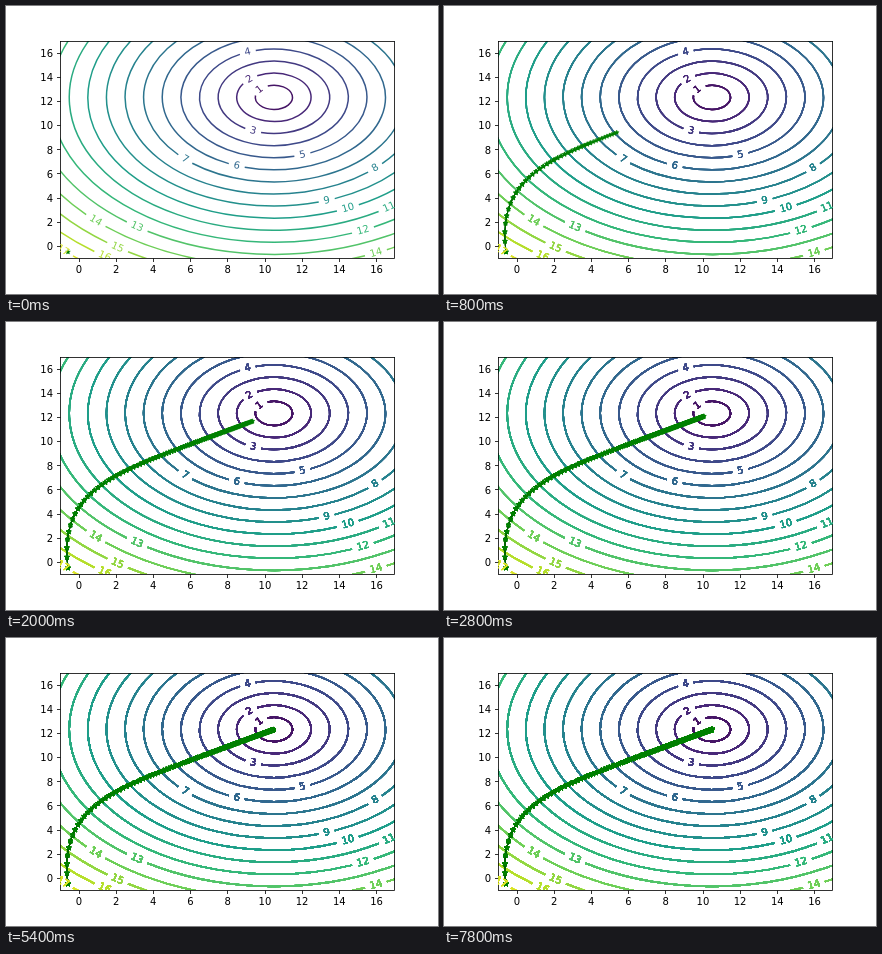
Write an HTML page that moves like this. It is 432x288 px and loops after 8 s.

```html
<!DOCTYPE html>
<html lang="en">
<head>
<meta charset="utf-8">
<title>Gradient descent on a contour plot</title>
<style>
  html, body { margin: 0; width: 100%; height: 100%; overflow: hidden; background: #fff; }
  svg { display: block; width: 432px; height: 288px; }
  text { font: 10px "DejaVu Sans", sans-serif; }
</style>
</head>
<body>
<svg id="stage" viewBox="0 0 432 288">
  <defs>
    <clipPath id="axes"><rect x="54" y="35" width="335" height="217"/></clipPath>
    <g id="rings" fill="none" stroke-width="1.5"></g>
    <g id="labels" text-anchor="middle"></g>
  </defs>
  <rect width="432" height="288" fill="#fff"/>
  <g clip-path="url(#axes)">
    <g id="ringLayers"></g>
    <g id="trailLayers" stroke-linejoin="bevel"></g>
  </g>
  <g id="frame" stroke="#000" stroke-width=".8" fill="none">
    <rect x="54.5" y="35.5" width="334" height="217"/>
  </g>
  <g id="ticks"></g>
  <g clip-path="url(#axes)"><g id="labelLayers"></g></g>
</svg>
<script>
const STEP = 200, COUNT = 40, PER_STEP = 10;
const UX = 18.6, UY = 12.08;                     // pixels per data unit
const px = x => 54 + (x + 1) * UX;
const py = y => 252 - (y + 1) * UY;
const GOAL = { x: 10.5, y: 12.3 };
const cx = px(GOAL.x), cy = py(GOAL.y);
const $ = id => document.getElementById(id);

function add(parent, tag, attrs, text) {
  const el = document.createElementNS('http://www.w3.org/2000/svg', tag);
  for (const k in attrs) el.setAttribute(k, attrs[k]);
  if (text !== undefined) el.textContent = text;
  parent.appendChild(el);
  return el;
}

// Viridis, sampled at every half stop
const VIRIDIS = ['440154', '482878', '3e4989', '31688e', '26828e',
                 '1f9e89', '35b779', '6ece58', 'b5de2b', 'fde725'];
const rgb = hex => [0, 2, 4].map(i => parseInt(hex.slice(i, i + 2), 16));
function color(level) {
  const a = rgb(VIRIDIS[Math.floor(level / 2)]), b = rgb(VIRIDIS[Math.ceil(level / 2)]);
  return `rgb(${a.map((v, i) => Math.round((v + b[i]) / 2))})`;
}

// Contour labels: level and the visible middle of the digits
const LABELS = [
  [1, 254, 83], [2, 243, 72], [3, 247, 124], [4, 241.5, 45], [5, 297, 149],
  [6, 230, 160], [7, 179.5, 152], [8, 369, 161], [9, 321, 194], [10, 342.5, 202],
  [11, 384, 201], [12, 357.5, 224], [13, 132, 219], [14, 90, 213.5], [14, 370, 246],
  [15, 112, 240], [16, 99, 249], [17, 57, 243.5]
];
const RISE = 0.85;                               // digits sit this far above the line
const gaps = {};                                 // level -> [centre angle, half width]

const onRing = (n, a) => [cx + UX * n * Math.cos(a), cy + UY * n * Math.sin(a)];
const fmt = p => p.map(v => v.toFixed(2)).join(' ');

for (const [n, x, y] of LABELS) {
  const a = Math.atan2((y + RISE - cy) / UY, (x - cx) / UX);
  const tx = -UX * n * Math.sin(a), ty = UY * n * Math.cos(a);
  const half = (n > 9 ? 6.36 : 3.18) + 5;
  (gaps[n] = gaps[n] || []).push([a, half / Math.hypot(tx, ty)]);
  const turn = Math.atan(ty / tx) * 180 / Math.PI;
  add($('labels'), 'text', {
    y: 3.65 - RISE, fill: color(n),
    transform: `translate(${fmt(onRing(n, a))}) rotate(${turn.toFixed(2)})`
  }, n);
}

function ringPath(n) {
  const list = gaps[n].sort((p, q) => p[0] - q[0]);
  return list.map(([a, h], i) => {
    const last = i === list.length - 1;
    const next = list[(i + 1) % list.length];
    const from = a + h, to = next[0] - next[1] + (last ? 2 * Math.PI : 0);
    const large = to - from > Math.PI ? 1 : 0;
    return `M${fmt(onRing(n, from))}A${UX * n} ${UY * n} 0 ${large} 1 ${fmt(onRing(n, to))}`;
  }).join('');
}
for (let n = 1; n <= 17; n++) add($('rings'), 'path', { d: ringPath(n), stroke: color(n) });

// Descent: a slow and a fast mode at right angles
const SLOPE = 0.567, SLOW = 13.87, FAST = 4.936;
function descent(k) {
  const s = SLOW * Math.pow(0.9754, k), f = FAST * Math.pow(0.859, k);
  return [px(GOAL.x - s + SLOPE * f), py(GOAL.y - SLOPE * s - f)];
}

const STAR = Array.from({ length: 10 }, (_, i) => {
  const r = i % 2 ? 1.2 : 2.5, a = i * Math.PI / 5;
  return [r * Math.sin(a), -r * Math.cos(a)];
});
const starAt = ([x, y]) => 'M' + STAR.map(([u, v]) => fmt([x + u, y + v])).join('L') + 'Z';

// Each step paints everything once more over the earlier layers
const layers = [];
let line = '', stars = '';
for (let j = 0, k = 0; j < COUNT; j++) {
  for (; k <= j * PER_STEP; k++) {
    const p = descent(k);
    line += (k ? 'L' : 'M') + fmt(p);
    stars += starAt(p);
  }
  const trail = add($('trailLayers'), 'g', {});
  add(trail, 'path', { d: line, fill: 'none', stroke: '#006400', 'stroke-width': 1 });
  add(trail, 'path', { d: stars, fill: '#008000', stroke: '#008000', 'stroke-width': 0.4 });
  layers.push([
    add($('ringLayers'), 'use', { href: '#rings' }),
    trail,
    add($('labelLayers'), 'use', { href: '#labels' })
  ]);
}

const snap = v => Math.round(v) + 0.5;
for (let v = 0; v <= 16; v += 2) {
  add($('frame'), 'path', { d: `M${snap(px(v))} 252.5v3.5M54.5 ${snap(py(v))}h-3.5` });
  add($('ticks'), 'text', { x: px(v) + 0.3, y: 267, 'text-anchor': 'middle' }, v);
  add($('ticks'), 'text', { x: 47, y: Math.round(py(v) + 4.3), 'text-anchor': 'end' }, v);
}

let shown = -1;
function render(t) {
  const step = Math.floor(t / STEP) % COUNT;
  if (step === shown) return;
  shown = step;
  layers.forEach((set, j) => {
    for (const el of set) el.style.display = j <= step ? '' : 'none';
  });
}

const start = performance.now();
function tick() {
  render(performance.now() - start);
  requestAnimationFrame(tick);
}
tick();
</script>
</body>
</html>
```
